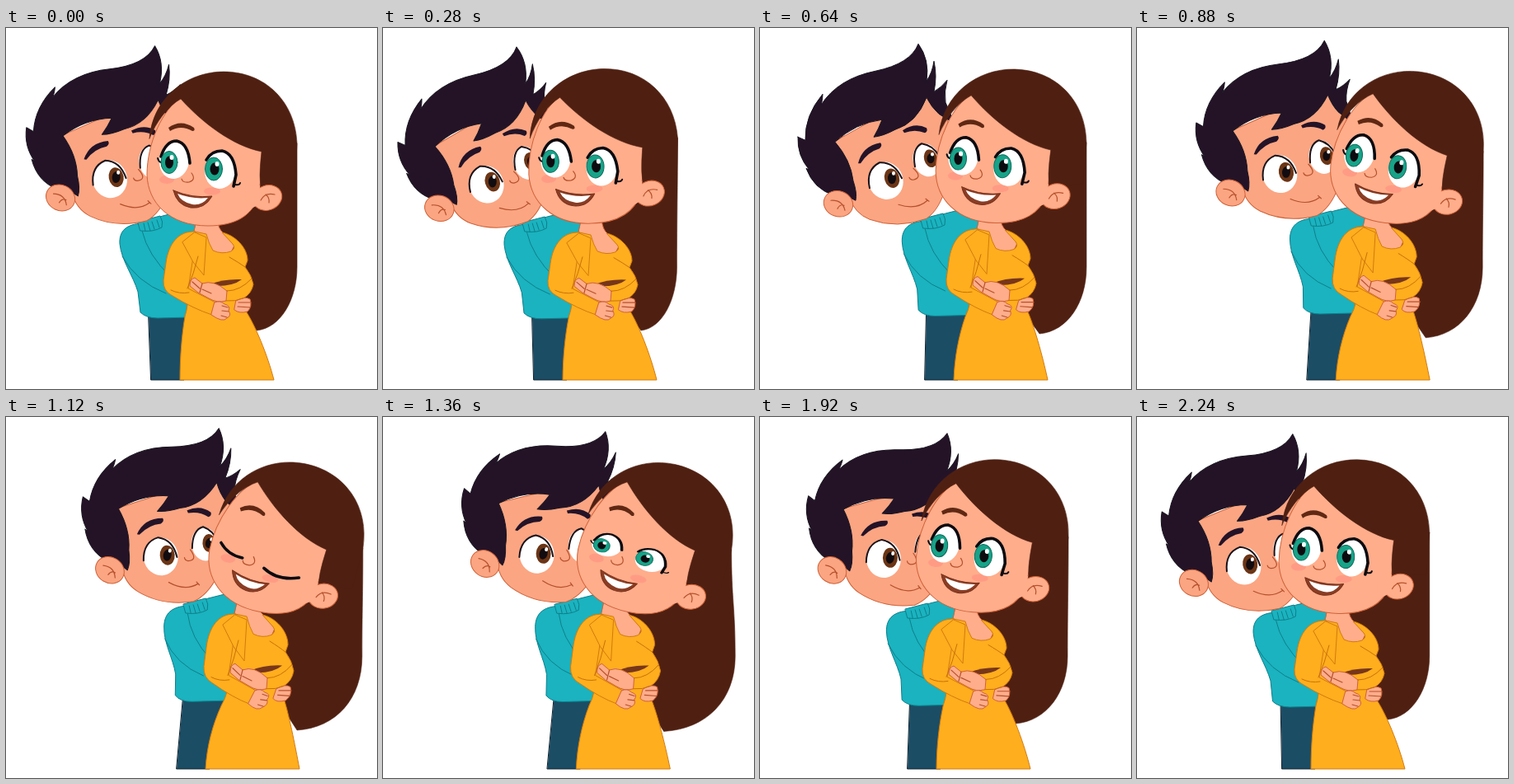
An HTML page for the animation above (2.28 s loop, 450 px wide and 438 px high).

```html
<!DOCTYPE html>
<html lang="en">
<head>
<meta charset="utf-8">
<title>Hugging couple</title>
<style>
  html, body { margin: 0; width: 100%; height: 100%; overflow: hidden; background: #fff; }
  svg { display: block; width: 450px; height: 438px; }
  path, ellipse { stroke-linecap: round; stroke-linejoin: round; }
  .skin { fill: #fba582; stroke: #cf6238; }
  .fair { fill: #ffad8b; stroke: #cf6238; }
  .line { fill: none; stroke: #b5512c; stroke-width: 1.2; }
  .knit { fill: #1ab3bf; stroke: #0f7f8b; }
  .rib { fill: none; stroke: #0f7f8b; }
  .dress { fill: #ffae1d; stroke: #d27a10; }
  .seam { fill: none; stroke: #c8700c; }
  .brown { fill: #4f2012; stroke: #4f2012; stroke-width: .6; }
  .ink { fill: #241327; stroke: #1a1620; }
  .lash { fill: none; stroke: #0c0a10; stroke-width: 3.6; }
</style>
</head>
<body>
<svg viewBox="0 0 450 438">
  <g id="hisBody">
    <path fill="#1b4d65" stroke="#10222e" d="M173 348 L224 348 L216 427 L176 427 Z"/>
    <path class="knit" d="M165 237 C146 238 137 246 138 262 C140 282 154 300 160 320 L163 345 Q170 352 184 352 L224 351 L240 300 L246 244 Q232 226 214 222 L190 228 Z"/>
    <path class="rib" d="M165 246 Q172 276 200 302 M141 277 Q158 308 194 322"/>
    <path class="knit" d="M160 235 L187 228 Q191 235 189 242 Q178 248 163 246 Z"/>
    <path class="rib" d="M167 237 L169 246 M172 236 L175 246 M177 235 L180 244 M183 233 L186 242"/>
  </g>

  <g id="hisHead">
    <path class="skin" d="M91 137 L143 108 L205 76 Q226 96 232 130 C232 175 225 215 202 231 Q166 244 133 232 Q115 225 108 205 Z"/>
    <path class="ink" d="M46 132 L55 136 Q54 106 76 80 Q76 88 74 93 Q95 61 140 52 Q183 43 192 19 Q206 38 202 64 Q209 54 211 40 Q215 58 211 77 Q220 72 227 63 Q223 77 225 90 L236 116 L217 104 Q208 96 202 84 Q190 115 164 123 Q149 131 138 132 Q144 122 148 111 Q116 115 91 138 Q110 160 113 185 Q118 200 116 209 Q100 200 90 203 Q65 195 56 170 L60 172 Q45 155 46 132 Z"/>
    <ellipse class="skin" cx="95" cy="213" rx="18" ry="15.5" transform="rotate(20 95 213)"/>
    <path class="line" d="M86 209 Q100 208 103 221 M94 219 Q97 213 102 215"/>
    <g fill="#fff">
      <ellipse cx="152.500" cy="185" rx="21" ry="23" transform="rotate(-20 152.500 185)"/>
      <ellipse cx="202" cy="160" rx="16" ry="20.500" transform="rotate(-20 202 160)"/>
    </g>
    <path fill="none" stroke="#1c1218" stroke-width="2" d="M133 194 Q128 172 145 163 Q163 162 172 182 M188 168 Q184 146 196 140 Q210 142 217 155"/>
    <g fill="#6b3516">
      <ellipse cx="160" cy="182" rx="9" ry="12" transform="rotate(-15 160 182)"/>
      <ellipse cx="207" cy="158" rx="8" ry="11" transform="rotate(-15 207 158)"/>
    </g>
    <g fill="#120c10">
      <ellipse cx="160" cy="182" rx="5" ry="7"/>
      <ellipse cx="207" cy="158" rx="4.500" ry="6"/>
    </g>
    <g fill="#fff">
      <ellipse cx="162" cy="176" rx="2" ry="2.500"/>
      <ellipse cx="209" cy="153" rx="2" ry="2.300"/>
    </g>
    <path fill="#241327" d="M119 164 Q124 143 146 139 Q149 142 145 146 Q131 150 122 164 Z M173 124 Q188 114 202 121 Q204 125 200 127 Q188 122 175 127 Z"/>
    <path class="line" d="M186 170 Q198 181 186 184 Q182 184 181 181"/>
    <path class="line" d="M168 214 Q190 221 203 209 M201 207 L205 210"/>
  </g>

  <path id="backHair" class="brown"/>

  <g id="herBody">
    <path class="fair" d="M232 230 L256 230 Q257 244 264 249 L277 264 L270 278 L250 278 L228 248 Z"/>
    <path class="dress" d="M229 247 L243 250 Q246 262 251 270 Q262 275 273 271 Q279 267 275 262 L262 248 C277 251 293 266 293 282 L290 290 Q298 300 300 311 Q298 322 288 328 L290 342 C302 360 317 396 325 427 L211 427 C211 400 213 374 217 350 Q222 334 220 320 L206 300 L208 255 Q216 247 229 247 Z"/>
    <path class="fair" d="M279 331 Q290 325 296 329 Q299 338 293 344 Q283 347 277 342 Z"/>
    <path class="line" d="M282 333 L297 333 M281 338 L296 339"/>
    <path fill="#78361a" d="M247 311 Q264 304 286 305 Q276 313 256 313 Z"/>
    <path class="fair" d="M268 319 L267 331 Q256 334 246 328 L233 321 L223 313 Q223 304 229 303 L238 310 Q252 305 268 319 Z"/>
    <path class="line" d="M238 310 L235 321 M226 308 L235 316 M238 317 L249 322"/>
    <path class="dress" d="M229 247 C209 246 197 262 194 285 L191 306 Q190 319 202 325 Q228 341 250 348 L254 333 L221 316 L227 278 Z"/>
    <path class="dress" stroke="none" d="M229 248 L243 254 L240 300 L227 284 L214 260 Z"/>
    <path class="seam" d="M233 277 Q228 298 220 316 M200 318 Q210 323 222 321 M271 278 Q283 285 290 290 M298 304 Q284 319 268 319 M267 331 Q278 332 288 328"/>
    <path class="fair" d="M253 333 Q260 330 265 335 Q273 337 270 343 Q274 349 268 352 Q263 358 249 348 Z"/>
    <path class="line" d="M262 337 L269 339 M262 343 L270 344 M261 349 L268 351"/>
  </g>

  <g id="herHead">
    <path class="fair" d="M213 84 C190 98 171 140 171 178 C172 212 198 240 245 240 C278 240 298 228 306 205 L314 148 Z"/>
    <path class="brown" d="M174 134 C178 84 220 53 264 53 C314 53 351 89 353 140 L350 190 L310 195 Q306 185 310 150 C275 143 238 115 212 86 C196 95 182 114 174 134 Z"/>
    <ellipse class="fair" cx="317" cy="206" rx="18" ry="15" transform="rotate(-20 317 206)"/>
    <path fill="#ffad8b" d="M290 190 L308 191 L307 214 L292 222 Z"/>
    <path class="line" d="M309 209 Q314 199 326 202 M315 202 Q320 206 319 212"/>
    <path fill="#602813" d="M197 121 Q212 110 228 121 Q230 125 226 125 Q212 117 199 125 Z"/>
    <g fill="#ff9783" opacity=".8">
      <ellipse cx="195" cy="184" rx="9" ry="5"/>
      <ellipse cx="250" cy="198" rx="10" ry="4.500"/>
    </g>
    <g id="eyes">
      <g fill="#fff">
        <ellipse cx="204" cy="161" rx="18" ry="22" transform="rotate(8 204 161)"/>
        <ellipse cx="260" cy="172" rx="19" ry="23" transform="rotate(8 260 172)"/>
      </g>
      <path class="lash" d="M188 156 Q194 137 207 137 Q221 140 223 164 M243 160 Q249 149 262 149 Q277 152 279 178 L276 192"/>
      <path class="lash" style="stroke-width:2" d="M188 163 Q185 162 184 158 M278 190 Q283 191 284 188"/>
      <g fill="#18a389" stroke="#0d6c5c">
        <ellipse cx="198" cy="163" rx="10" ry="13.500"/>
        <ellipse cx="252" cy="171" rx="10.500" ry="14"/>
      </g>
      <g fill="#0c0c10">
        <ellipse cx="198" cy="163" rx="5" ry="7.500"/>
        <ellipse cx="253" cy="171" rx="5.500" ry="7.500"/>
      </g>
      <g fill="#fff">
        <ellipse cx="201" cy="157" rx="2.500" ry="3"/>
        <ellipse cx="256" cy="165" rx="2.500" ry="3"/>
      </g>
    </g>
    <path id="lids" class="lash" d="M183 167 Q194 180 212 180 M240 187 Q259 199 284 190"/>
    <path class="line" d="M225 176 Q231 184 222 187 Q214 188 213 183"/>
    <path fill="#8a3d24" stroke="#7a3019" d="M203 197 Q226 207 250 204 Q241 220 224 218 Q207 215 203 197 Z"/>
    <path fill="#fff" d="M208 201 Q226 208 245 206 Q237 216 226 214 Q212 211 208 201 Z"/>
  </g>
</svg>
<script>
const LOOP = 2280, STEP = 40;
// time, her head x y angle, hair tip lag, hair bottom, his head x y angle, hem, her chest, his chest, lift
const KEYS = [
  [0, 220, 183, 0, 0, 367, 100, 132.5, 5.3, 0, 0, 0, 0],
  [280, 226, 181, -2, -1, 367, 94, 142, -1, 7, 9, 9, 1],
  [640, 262, 179, 1.3, 0, 371, 122, 137, 0, 24, 35, 34, -3],
  [1120, 294, 175.5, 11.4, -1, 380, 167, 116, 11, 31, 49, 53, -8],
  [1600, 264, 176, 10.4, 8, 380, 161.5, 112, 18, 13, 20, 33, -6],
  [1920, 238, 178, 4.6, -1, 372, 131.5, 118, 13.5, 3, 6, 15, -2],
  [2240, 221, 181, 1, 0, 367, 105, 129, 7, 0, 0, 3, 0]
];
const N = KEYS.length;
const el = id => document.getElementById(id);
const clamp = (v, lo, hi) => Math.max(lo, Math.min(hi, v));

function key(i, c) {
  const turn = Math.floor(i / N), v = KEYS[i - turn * N][c];
  return c ? v : v + turn * LOOP;
}

function slope(i, c) {
  const before = key(i, 0) - key(i - 1, 0), after = key(i + 1, 0) - key(i, 0);
  const a = (key(i, c) - key(i - 1, c)) / before, b = (key(i + 1, c) - key(i, c)) / after;
  return (a * after + b * before) / (before + after);
}

// Periodic cubic through the keys
function pose(t) {
  let i = N - 1;
  while (key(i, 0) > t) i--;
  const h = key(i + 1, 0) - key(i, 0), u = (t - key(i, 0)) / h, w = 1 - u;
  return KEYS[0].map((_, c) => c === 0 ? t :
    w * w * (1 + 2 * u) * key(i, c) + u * u * (3 - 2 * u) * key(i + 1, c) +
    u * w * h * (w * slope(i, c) - u * slope(i + 1, c)));
}

const bodyPaths = id => [...el(id).querySelectorAll('path')].map(p => [p, p.getAttribute('d')]);
const hers = bodyPaths('herBody'), his = bodyPaths('hisBody');
const herBend = up => Math.min(1, up / 90) ** 2;
const hisBend = up => Math.min(1.1, up / 160);

// Slides the hem and chest by different amounts and lifts what is above the waist
function lean(paths, hem, chest, lift, bend, waist) {
  for (const [p, d] of paths) {
    p.setAttribute('d', d.replace(/([\d.]+) ([\d.]+)/g, (_, x, y) =>
      (+x + hem + (chest - hem) * bend(427 - y)).toFixed(2) + ' ' +
      (+y + lift * clamp((waist - y) / 90, 0, 1)).toFixed(2)));
  }
}

function draw(t) {
  const [, hx, hy, ha, lag, bottom, mx, my, ma, hem, chest, mChest, lift] = pose(t);
  const rad = ha * Math.PI / 180, cos = Math.cos(rad), sin = Math.sin(rad);
  const onHead = (x, y) => [hx + (x - 220) * cos - (y - 183) * sin,
                            hy + (x - 220) * sin + (y - 183) * cos];

  el('herHead').setAttribute('transform', `translate(${hx} ${hy}) rotate(${ha}) translate(-220 -183)`);
  el('hisHead').setAttribute('transform', `translate(${mx} ${my}) rotate(${ma}) translate(-122 -136.75)`);
  lean(hers, hem, chest, lift, herBend, 345);
  lean(his, hem, mChest, lift, hisBend, 427);

  const side = onHead(353, 140), r = side[0] + lag, x = 304 + chest;
  el('backHair').setAttribute('d', `M${onHead(300, 80)} L${side}
    C${side[0]} ${side[1] + 60} ${r} 230 ${r} 290
    C${r} ${bottom - 38} ${x + (r - x) * .6} ${bottom - 3} ${x} ${bottom}
    L${252 + chest} 300 L${onHead(240, 232)} Z`);

  const open = clamp((Math.abs(t - 1160) - 140) / 100, 0, 1), shut = open < .2;
  el('eyes').setAttribute('transform', `matrix(1 0 0 ${open} 0 ${175 * (1 - open)})`);
  el('eyes').style.display = shut ? 'none' : '';
  el('lids').style.display = shut ? '' : 'none';
}

function tick() {
  draw(Math.floor(performance.now() % LOOP / STEP) * STEP);
  requestAnimationFrame(tick);
}
tick();
</script>
</body>
</html>
```
